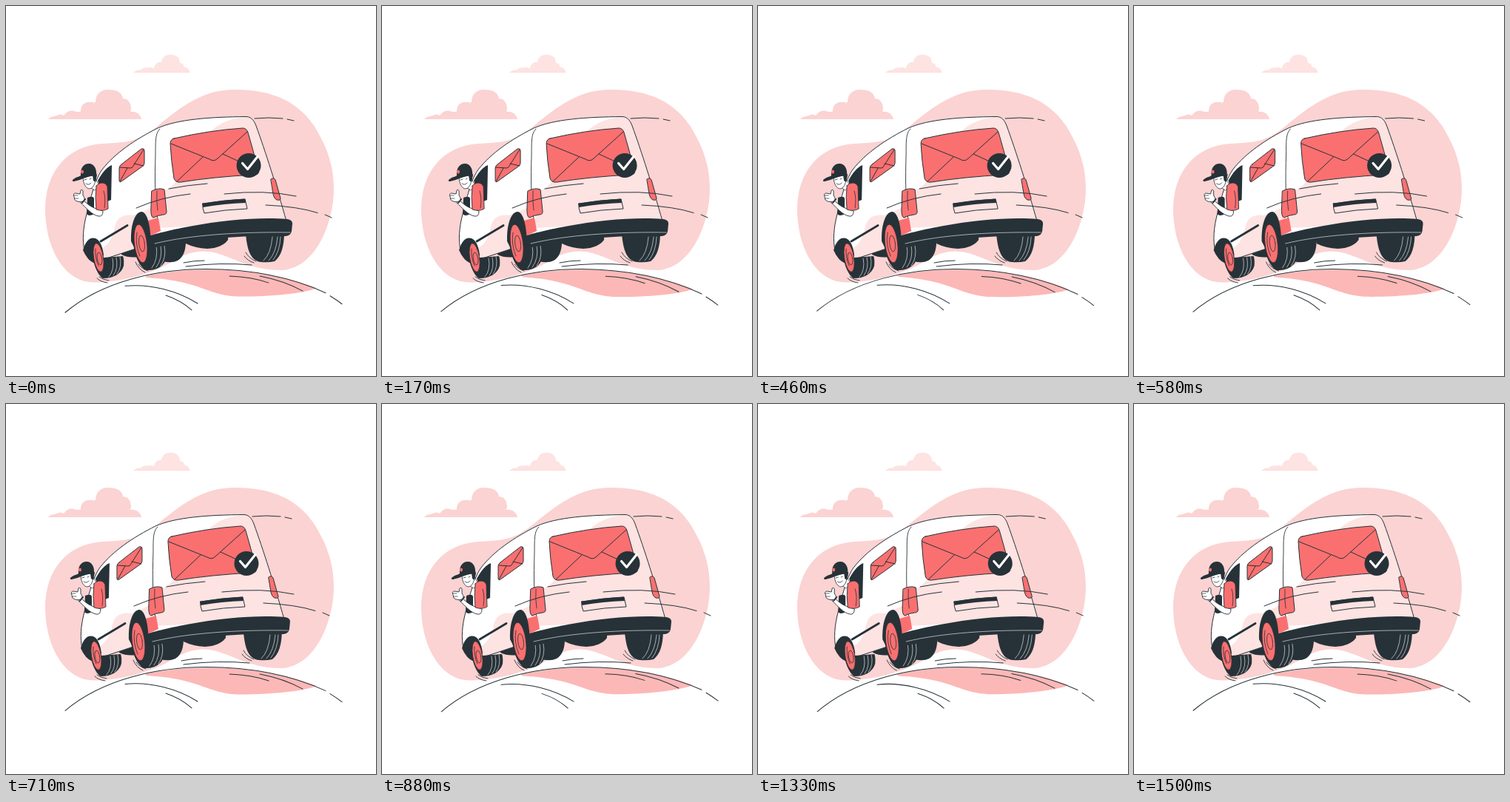
Animation, 500 px wide and 500 px high, one loop 1540 ms. Source, as an HTML page with a canvas:

```html
<!DOCTYPE html>
<html lang="en">
<head>
<meta charset="utf-8">
<title>Delivery van</title>
<style>
  html, body { margin: 0; width: 100%; height: 100%; overflow: hidden; background: #fff; }
  canvas { display: block; width: 500px; height: 500px; }
</style>
</head>
<body>
<canvas id="stage"></canvas>
<script>
const LOOP = 1540, CYCLE = 1500, STEP = 1000 / 24, LEAD = 28;
const DARK = '#263238', RED = '#fa7070', BLUSH = '#fbd3d2', PALE = '#fde3e2', ROSE = '#fcb8b7', WHITE = '#fff';

const canvas = document.getElementById('stage');
const ctx = canvas.getContext('2d');
const ratio = window.devicePixelRatio || 1;
canvas.width = canvas.height = 500 * ratio;

// Each key is [progress, value]; values run linearly in between.
const SHAKE = [[0, 0], [.1, -1], [.2, 2], [.3, -4], [.4, 4], [.5, -4], [.6, 4], [.7, -4], [.8, 2], [.9, -1], [1, 0]];
const SWAY = [[0, 0], [.25, 1], [.75, -1], [1, 0]];

function track(keys, p) {
  const i = Math.max(1, keys.findIndex(k => k[0] >= p));
  const [p0, v0] = keys[i - 1], [p1, v1] = keys[i];
  return v0 + (v1 - v0) * (p - p0) / (p1 - p0);
}

const paths = new Map();
function path(d) {
  if (!paths.has(d)) paths.set(d, new Path2D(d));
  return paths.get(d);
}

function line(d, color = DARK, width = 1) {
  ctx.strokeStyle = color;
  ctx.lineWidth = width;
  ctx.stroke(path(d));
}

function fill(d, color, outline) {
  ctx.fillStyle = color;
  ctx.fill(path(d));
  if (outline) line(d, DARK, outline);
}

function oval(x, y, rx, ry, turn, color, outline) {
  ctx.beginPath();
  ctx.ellipse(x, y, rx, ry, turn, 0, Math.PI * 2);
  if (color) { ctx.fillStyle = color; ctx.fill(); }
  if (outline) { ctx.strokeStyle = DARK; ctx.lineWidth = outline; ctx.stroke(); }
}

function drawBackdrop() {
  fill('M53 275C53 225 82 189 130 186C165 184 177 184 204 163C240 133 268 113 309 113C361 113 398 130 420 168C434 192 443 216 443 247C443 290 420 355 372 357C335 357 315 344 285 334C262 328 245 333 225 345C195 364 150 373.5 118 373.5C78 373 53 325 53 275Z', BLUSH);
  fill('M173 89.5C176 86 181 87 183 86C186 82 192 84 196 83C199 83 198 85 200 84C201 78 206 75 210 76C211 69 216 66 220 66C230 65 235 70 235 77C239 77 241 80 240 82C245 83 248 86 248 89.5Z', PALE);
  line('M173 89.5H248', BLUSH, .7);
  fill('M57 153C60 149 68 149 71 147C75 145 75 149 79 147C82 142 89 140 94 143C97 142 100 144 101 142C101 134 106 129 116 130C119 130 120 132 121 129C122 118 128 113 138 113C150 113 157 117 158 125C164 125 169 130 169 139L168 143C176 142 182 147 183 153Z', BLUSH);
}

function drawGround() {
  fill('M188 364.5C255 351 345 352 420 381C400 389 350 393 312 392.5C270 390 262 371 190 367Z', ROSE);
  line('M80 414.5C130 372 205 355.5 270 355.5C330 355.5 385 366 432 387.5M438 391.5Q447 397 454 402.5');
  line('M161 378.5C195 375 232 385 259 402M216 391Q237 398 251 411');
  line('M302 365Q332 366 355 374M343 365Q375 371 401 385');
}

function drawUnderside() {
  fill('M324 308C326 334 333 345 345 346Q354 347 363 345C372 338 376 325 376 304Z', DARK);
  line('M348 344Q358 335 360 312M355 344Q365 334 367 312M361 343Q370 332 371 312', WHITE, .6);
  fill('M212 318L243 313Q244 337 232 344Q224 348 212 345Z', DARK);
  fill('M243 314L300 308V316Q292 327 272 328Q255 327 243 321Z', DARK);
  fill('M156 331L180 322V339Q166 341 156 336Z', DARK);
}

function drawBody() {
  const body = 'M106 331C103 316 104 300 109 281C116 252 122 232 130 221C147 199 175 180 205 165C232 153 275 150 325 149.5C331 150 335 154 338 162C350 195 366 245 379 291L378 302L195 320L178 327L133 342Q116 342 106 331Z';
  fill(body, WHITE);
  fill('M124 330C140 324 144 312 147 298C150 285 160 281 172 283L203 270L205 300L178 327L133 342Z', PALE);
  fill('M325 150C300 152 284 160 268 178C250 205 235 240 214 250L205 300L379 291C366 245 350 195 338 162Q334 152 325 150Z', PALE);
  line(body);
  line('M208 166C202 172 202 180 202 200C201 235 201 260 205 290', DARK, .9);
  line('M128 318L164 296.5', DARK, 2.8);
}

function drawWindows() {
  fill('M156 214Q170 203 183 193Q187 192 187 196V212Q187 215 184 217L156 237Q153 239 153 235V219Q153 216 156 214Z', RED, 1);
  line('M154 218L168 219Q171 219 172 216L186 194M154 237L164 219M173 213L186 216');
  fill('M227 179Q275 168 320 165Q325 165 327 171Q334 195 341 222Q343 228 335 228Q280 231 236 238Q229 239 227 233Q223 208 222 186Q222 180 227 179Z', RED, 1);
  line('M223 186L275 207Q281 211 286 206L326 170M231 237L266 204M293 200L319 212');
  oval(328, 215.5, 16.5, 16.5, 0, DARK);
  line('M319.5 212.5L326.5 220.5L340 203.5', WHITE, 3.2);
}

function drawRear() {
  fill('M192 290L206 286L209 304L194 311Z', RED);
  fill('M197 250Q206 245 214 248L217 278Q217 282 212 282Q205 283 199 286Q195 285 196 270Z', RED, 1);
  line('M204 250Q203 264 205 276', DARK, .8);
  fill('M358 234Q362 231 364 235L371 260Q371 263 366 262Q362 260 361 254Z', RED, 1);
  fill('M266 267Q295 262 323 261L326 274Q296 275 268 280Q265 273 266 267Z', PALE, 1);
  fill('M265 267Q295 262 323 260.5L324 266Q295 267 266 272Z', DARK);
}

function drawWheels() {
  fill('M104 330C108 315 115 312 121 314C128 317 131 328 132 337L120 348Q110 344 104 330Z', DARK);
  fill('M119 322C113 335 121 362 131 368C145 368 156 362 159 351C160 342 158 338 158 338L132 340Z', DARK);
  line('M139 366Q147 357 144 341M145 364Q152 355 149 340M150 362Q157 353 154 339', WHITE, .6);
  oval(125, 340, 6.5, 19.5, -.16, RED, .8);
  oval(126.5, 341.5, 3.2, 8.5, -.16, null, .8);
  line('M121 328Q120 340 125 351', DARK, .8);

  fill('M169 318C168 292 176 278 183 278C191 279 195 295 196 322L180 340Z', DARK);
  fill('M174 300C168 320 176 350 189 357C203 358 216 352 218 335L216 322L195 318Z', DARK);
  line('M197 354Q206 342 203 324M203 353Q212 341 209 324M209 351Q217 340 214 324', WHITE, .6);
  oval(182, 321, 8.5, 26, -.12, RED, .8);
  oval(183.5, 321, 3.8, 11, -.12, null, .8);
  line('M177 306Q174 322 181 338', DARK, .8);
}

function drawBumper() {
  fill('M193 311C200 308 230 301 250 297.5C295 289 345 285 380 288Q387 289 387 294L386 304Q385 310 378 311C320 310 260 314 203 326Q195 326 193 311Z', DARK);
  line('M201 321C250 309 320 305 384 306', WHITE, .6);
}

function drawDriver() {
  fill('M124 236C130 225 136 218 143 215L142 262L132 266Z', DARK);
  fill('M110 259Q118 256 119 260V281Q112 285 109 281Z', DARK);
  fill('M111 242L121 234L126 243L120 249Z', WHITE, .7);
  fill('M104 231C104 240 108 247 113 247C119 246 121 238 122 229Z', WHITE, .8);
  fill('M117 229L123 227L121 238L118 236Z', DARK);
  line('M108 240Q112 243 115 239M106 235L109 234M113 234L115 233', DARK, .8);
  fill('M90 235C94 231 99 231 101 229C100 219 105 213 112 213C119 213 123 220 122 229C112 229 102 235 92 237Q89 237 90 235Z', DARK);
  oval(103, 224, 2, 2.6, 0, RED);
  fill('M104 262C112 270 118 273 123 274L131 277Q131 285 125 284C115 282 108 272 101 266Z', WHITE, .9);
  fill('M122 243C126 238 134 237 137 244L138 274Q131 278 122 275Q120 258 122 243Z', RED, .9);
  line('M132 250Q135 260 133 273', DARK, .8);
  fill('M92 258Q90 253 94 253L100 254L101 249Q103 247 104 250L104 256Q108 261 104 264Q97 266 93 262Z', WHITE, .9);
  line('M92 256L97 256M93 260L98 260', DARK, .7);
  line('M107 261L103 266', DARK, 2);
}

function drawSpeedLines() {
  line('M220 247Q245 242 272 240M176 273Q210 258 249 254M295 254Q350 248 392 257');
  line('M351 269Q395 271 421 279.5M431 282L440 286M336 152Q355 150 374 152M380 153L389 155');
  line('M240 347Q254 344 268 344M243 352Q290 346 332 350');
  line('M123 368Q128 373 137 374M126 366Q131 370 139 371', DARK, .9);
  line('M175 346Q179 356 188 360M179 349Q183 355 192 358', DARK, .9);
  line('M322 338Q326 344 335 347M324 333Q328 341 338 345', DARK, .9);
}

function drawVan() {
  drawUnderside();
  drawBody();
  drawWindows();
  drawRear();
  drawWheels();
  drawBumper();
  drawDriver();
  drawSpeedLines();
}

function render(now) {
  const tick = Math.floor((now % LOOP + 5) / STEP);
  const p = (tick * STEP + LEAD) % CYCLE / CYCLE;

  ctx.setTransform(ratio, 0, 0, ratio, 0, 0);
  ctx.fillStyle = WHITE;
  ctx.fillRect(0, 0, 500, 500);
  ctx.lineCap = ctx.lineJoin = 'round';
  drawBackdrop();

  ctx.save();
  ctx.translate(267, 385);
  ctx.rotate(track(SWAY, p) * Math.PI / 180);
  ctx.translate(-267, -385);
  drawGround();
  ctx.restore();

  ctx.save();
  ctx.translate(track(SHAKE, p) + .2, 0);
  drawVan();
  ctx.restore();
}

const start = performance.now();
function loop() {
  render(performance.now() - start);
  requestAnimationFrame(loop);
}
loop();
</script>
</body>
</html>
```
